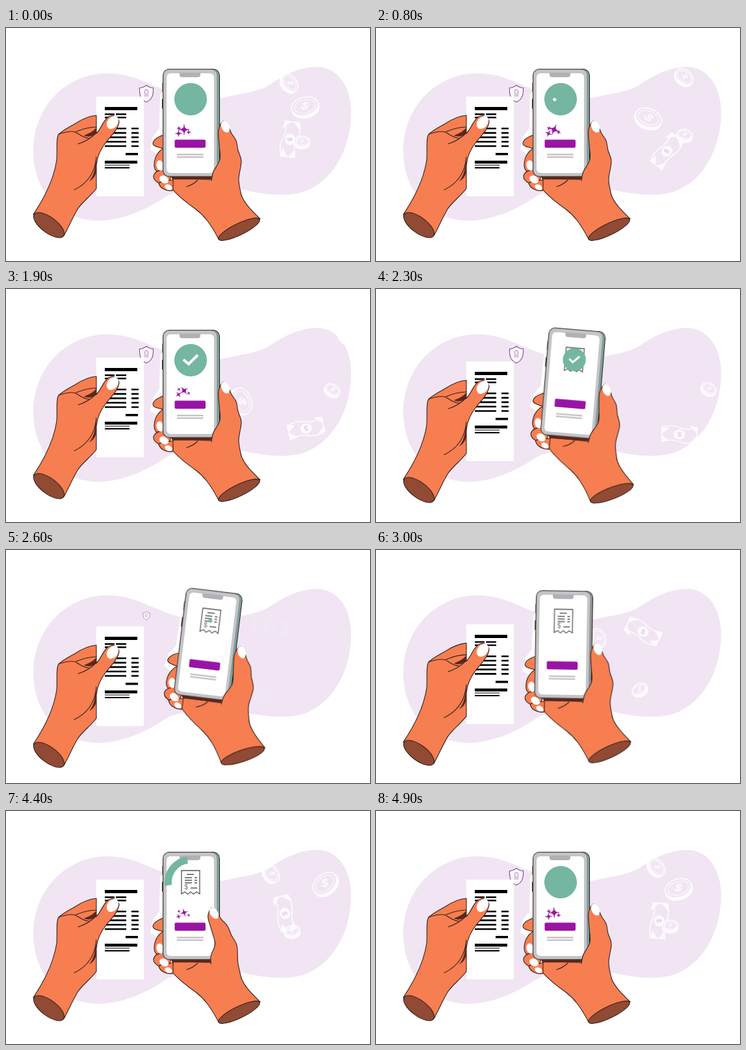
Recreate the animation shown at these times as an HTML page. Size 560 by 360 pixels, loop 5000 ms.

```html
<!DOCTYPE html>
<html lang="en">
<head>
<meta charset="utf-8">
<title>Paying a bill by phone</title>
<style>
html, body { margin: 0; width: 100%; height: 100%; overflow: hidden; background: #fff; }
svg { display: block; width: 560px; height: 360px; }
.ink, .skin, .cut { stroke: #33201b; stroke-width: 1.1; stroke-linecap: round; stroke-linejoin: round; }
.ink { fill: none; }
.skin { fill: #f67e51; }
.cut { fill: #914a34; }
.dark { fill: #5a281b; }
.nail { fill: #fff; }
.cash { fill: none; stroke: #fff; stroke-width: 1.6; }
.cash text { font: bold 17px "Liberation Sans", sans-serif; fill: #fff; stroke: none; text-anchor: middle; }
.cash .solid { fill: #fff; }
</style>
</head>
<body>
<svg viewBox="0 0 560 360">
  <path fill="#f1e5f4" d="M42 190C42 120 95 70 155 70C190 70 210 82 235 92C262 104 300 112 332 108C360 101 382 100 402 90C430 70 455 60 478 60C510 60 531 90 531 130C531 190 500 240 455 254C425 262 390 256 365 250C330 244 280 246 250 258C225 275 185 298 140 298C80 296 42 250 42 190Z"/>

  <g id="cash"></g>

  <g id="shield">
    <path fill="#fbf7fc" stroke="#83498f" stroke-width="1.1" d="M0-13C-4-10-7-9-10.500-9C-11 2-9 9 0 13C9 9 11 2 10.500-9C7-9 4-10 0-13Z"/>
    <path fill="none" stroke="#a87bb3" d="M-2.500-1V-4A2.500 2.500 0 0 1 2.500-4V-1"/>
    <rect x="-3.500" y="-1" width="7" height="5.500" fill="#dcc6e2"/>
  </g>

  <g id="left">
    <rect x="139" y="106" width="73" height="154" fill="#fff"/>
    <path id="bars"/>
    <path class="skin" d="M42 288C62 258 74 232 78 204C79 185 77 175 80 166C82 161 95 154 106 148C115 142 126 136 139 135V163C147 155 149 143 158 137C166 133 174 138 174 146C172 156 165 163 155 175C146 186 140 200 139 212V248C130 260 118 268 110 280C102 294 96 308 89 321Z"/>
    <path class="dark" d="M120 166C127 163 134 160 139 154V162C133 168 127 169 120 166ZM139 196C137 214 137 226 128 237C136 233 138 226 139 222Z"/>
    <path class="ink" d="M81 164C90 161 101 159 107 161C114 165 119 170 127 170M108 160C118 156 128 153 139 153M139 162C131 170 121 176 111 179M139 200C137 222 126 240 105 250"/>
    <ellipse class="nail" cx="164" cy="146" rx="8" ry="11" transform="rotate(38 164 146)"/>
    <ellipse class="cut" cx="66" cy="304.500" rx="28" ry="12" transform="rotate(37 66 304.500)"/>
  </g>

  <g id="right">
    <path fill="#fff" d="M250 90L237 102L236 155L226 168L222 188L240 200Z"/>
    <path class="skin" d="M246 164C236 167 227 172 226 178C226 183 234 184 246 187Z"/>
    <path class="skin" d="M248 182C234 189 228 200 228 212C228 221 234 225 248 226Z"/>
    <path class="skin" d="M256 219C238 218 230 220 227 228C226 236 234 241 250 244Z"/>
    <path class="skin" d="M262 234C248 236 238 236 235 240C237 248 248 253 257 251C261 249 262 242 262 234Z"/>
    <ellipse class="nail" cx="237" cy="212.500" rx="5.500" ry="8" transform="rotate(-15 237 212)"/>
    <ellipse class="nail" cx="243" cy="234" rx="7.500" ry="5.500" transform="rotate(32 243 234)"/>
    <ellipse class="nail" cx="250" cy="246" rx="6" ry="4" transform="rotate(25 250 246)"/>

    <path class="skin" d="M316 234L345 225L362 258C367 272 380 284 391 295L327 326C314 301 304 289 292 280C278 270 266 261 257 250L257 233Z"/>
    <ellipse class="cut" cx="358.500" cy="311" rx="35" ry="9" transform="rotate(-26 358.500 311)"/>
    <path class="dark" d="M252 226H320L315 234H256Z"/>
    <path class="ink" d="M278 245C285 243 291 239 295 235"/>

    <rect id="side" class="ink" x="241.500" y="63.500" width="87" height="166" rx="10"/>
    <path class="ink" d="M241 85V98M240.500 110V124"/>
    <rect x="242" y="64" width="83" height="165" rx="9" fill="#c5c4c8" stroke="#77767a" stroke-width=".8"/>
    <rect x="247" y="70" width="73" height="154" rx="6" fill="#fff"/>
    <path fill="#b1b0b5" d="M267 69H299V72Q299 76 295 76H271Q267 76 267 72Z"/>

    <g transform="translate(284 110)">
      <path fill="#fff" stroke="#55545a" stroke-width="1.300" d="M-14 18V-18H14V18L9 15L4.500 18.500L0 15L-4.500 18.500L-9 15Z"/>
      <path stroke="#55545a" stroke-width="1.500" d="M-6-12H5M-9-7H2M6-7H10M-9-3H2M6-3H10M-9 1H2M6 1H10M0 9H10"/>
      <text x="-9.500" y="11" font-size="10" font-family="Liberation Sans, sans-serif" fill="#55756f">$</text>
      <g id="disc">
        <circle id="ring" fill="none" stroke="#74b6a1" pathLength="1" transform="rotate(172)"/>
        <path id="check" fill="none" stroke="#fff" stroke-width="4.200" pathLength="1" d="M-11-1L-3 6L11-8"/>
      </g>
    </g>

    <g id="stars" fill="#97149f"></g>
    <rect x="259.500" y="172.500" width="47.500" height="12.500" rx="2" fill="#9914a5"/>
    <path stroke="#b9b7bb" stroke-width="2" d="M263 195.500H303.500M263 199.500H303.500"/>

    <path id="thumb" fill="#f67e51"/>
    <path id="edge" class="ink"/>
    <ellipse id="nail" class="nail" rx="6" ry="9.500"/>
  </g>
</svg>
<script>
const $ = id => document.getElementById(id);
const set = (el, attrs) => { for (const k in attrs) el.setAttribute(k, attrs[k]); };
const clamp = u => Math.min(1, Math.max(0, u));

// Eased passage from 0 to 1 between times a and b
const ramp = (t, a, b) => { const u = clamp((t - a) / (b - a)); return u * u * (3 - 2 * u); };
// Rises from a to b, falls back from c to d
const pulse = (t, a, b, c, d) => ramp(t, a, b) - ramp(t, c, d);

// Receipt print
const bar = (x, y, w, h) => `M${x} ${y}h${w}v${h}h${-w}z`;
let bars = bar(152, 122, 50, 5) + bar(184, 193, 19, 3.5) + bar(152, 205, 50, 4.5) +
  bar(152, 211.5, 38, 1) + bar(152, 215, 38, 2);
for (const y of [132, 137]) bars += bar(152, y, 15, 2.4) + bar(169, y, 16, 2.4);
for (let y = 154; y < 184; y += 6.8) bars += bar(152, y, 33, 2.6) + bar(193, y, 11, 2.6);
set($('bars'), { d: bars });

const star = (x, y, r) =>
  `<path data-at="${x} ${y}" d="M0 ${-r}Q0 0 ${r} 0Q0 0 0 ${r}Q0 0 ${-r} 0Q0 0 0 ${-r}Z" stroke="#97149f" stroke-width=".6"/>`;
$('stars').innerHTML = star(274, 157, 8) + star(265.5, 163, 5) + star(266, 155, 3) + star(281, 161, 3);

const coin = r => `<g class="cash">
  <path class="solid" d="M${-r} 0v4A${r} ${r * .67} 0 0 0 ${r} 4v-4A${r} ${r * .67} 0 0 1 ${-r} 0"/>
  <ellipse rx="${r}" ry="${r * .67}"/><ellipse rx="${r * .78}" ry="${r * .48}" stroke-width="1"/>
  <text y="5" transform="scale(${r / 18} ${r / 22}) rotate(35)">$</text></g>`;
const bill = `<g class="cash">
  <path d="M-27-11Q-13-16 0-11T27-11V11Q13 16 0 11T-27 11Z"/>
  <path class="solid" d="M-27-11L-17-13L-27-3ZM27-11L17-9L27-2ZM-27 11L-17 13L-27 3ZM27 11L17 9L27 2Z"/>
  <ellipse class="solid" rx="8" ry="7"/><text y="4" style="font-size:11px;fill:#dcc6e2">$</text></g>`;

// Drifting money: place, speed per second, bend of the path, angle and spin
const money = [
  { art: coin(15), x: 437, y: 85, vx: 47, vy: -16, bend: 4.8, angle: 50, spin: -12 },
  { art: coin(21), x: 460, y: 121, vx: -51, vy: 18, bend: 5, angle: -15, spin: 45 },
  { art: coin(12), x: 455, y: 175, vx: 25, vy: -15, bend: 2.5, angle: 0, spin: 15 },
  { art: bill, x: 437, y: 172, vx: 13, vy: 23, bend: 0, angle: 98, spin: 36 }
];
$('cash').innerHTML = money.map(m => m.art).join('');

// Smooth open curve through points
function curve(pts) {
  const at = i => pts[Math.min(pts.length - 1, Math.max(0, i))];
  let d = 'M' + pts[0];
  for (let i = 0; i < pts.length - 1; i++) {
    const [a, b, c, e] = [-1, 0, 1, 2].map(k => at(i + k));
    d += `C${b.map((v, k) => v + (c[k] - a[k]) / 6)} ${c.map((v, k) => v - (e[k] - b[k]) / 6)} ${c}`;
  }
  return d;
}

const thumb = [[316, 236], [319, 222], [329, 203], [328, 180], [327, 158], [334, 144],
  [342, 152], [347, 163], [354, 174], [357, 189], [362, 206], [358, 234], [362, 258]];
// The higher a point of the thumb, the further it swings
const swing = ([x, y], p) => {
  const w = p * clamp((240 - y) / 88);
  return [x - 18 * w, y + 5.5 * w];
};

function draw(t) {
  // Clock for things that live on across the loop's seam
  const s = t < 2500 ? t + 5000 : t, d = (s - 5000) / 1000;

  set($('left'), { transform: `translate(0 ${12 * pulse(t, 2000, 2600, 2800, 3400)})` });
  set($('right'), { transform: `rotate(${7.4 * pulse(t, 2000, 2500, 2500, 3150)} 305 362)` });
  set($('side'), { style: `fill:${t > 2600 && t < 4000 ? '#98989c' : '#74aaa0'}` });

  const p = 1.6 * pulse(t, 3300, 4100, 4100, 4800);
  const edge = curve(thumb.map(pt => swing(pt, p)));
  set($('edge'), { d: edge });
  set($('thumb'), { d: edge + 'L316 244Z' });
  set($('nail'), { transform: `translate(${swing([337.5, 152.5], p)}) rotate(${-24 - 8 * p})` });

  // The green badge sweeps in as a ring, closes to a disc, later shrinks away
  const late = t >= 4300, close = late ? ramp(t, 4550, 4800) : 1;
  const outer = 40 - 15 * close, hole = 29 * (1 - close);
  const sweep = late ? Math.min(1.01, .25 * (t - 4300) / 100) : 1.01;
  const size = late ? 1 : 1 - ramp(t, 2050, 2750);
  const tick = late ? 0 : ramp(t, 700, 1100);
  set($('disc'), { transform: `scale(${size})`, visibility: size && sweep ? 'visible' : 'hidden' });
  set($('ring'), { r: (outer + hole) / 2, 'stroke-width': outer - hole, 'stroke-dasharray': `${sweep} 2` });
  set($('check'), { 'stroke-dasharray': `${tick} 2`, opacity: tick ? 1 : 0 });

  const glow = pulse(s, 4200, 4500, 6800, 7200);
  for (const el of $('stars').children)
    set(el, { transform: `translate(${el.dataset.at}) rotate(${28 * d}) scale(${glow})` });
  set($('shield'), { transform: `translate(216 101.500) scale(${pulse(s, 4450, 4800, 7400, 7800) + 1 - ramp(s, 2400, 2800)})` });

  set($('cash'), { opacity: .85 * pulse(s, 2500, 2900, 7250, 7500) });
  money.forEach((m, i) => set($('cash').children[i], {
    transform: `translate(${m.x + m.vx * d} ${m.y + m.vy * d + m.bend * d * d}) rotate(${m.angle + m.spin * d})`
  }));
}

// Ten pictures a second, with two short holds
function step(ms) {
  const t = Math.floor(ms % 5000 / 100) * 100;
  return t > 100 && t < 700 ? 100 : t === 900 ? 800 : t;
}

const start = performance.now();
function play() {
  draw(step(performance.now() - start));
  requestAnimationFrame(play);
}
play();
</script>
</body>
</html>
```
